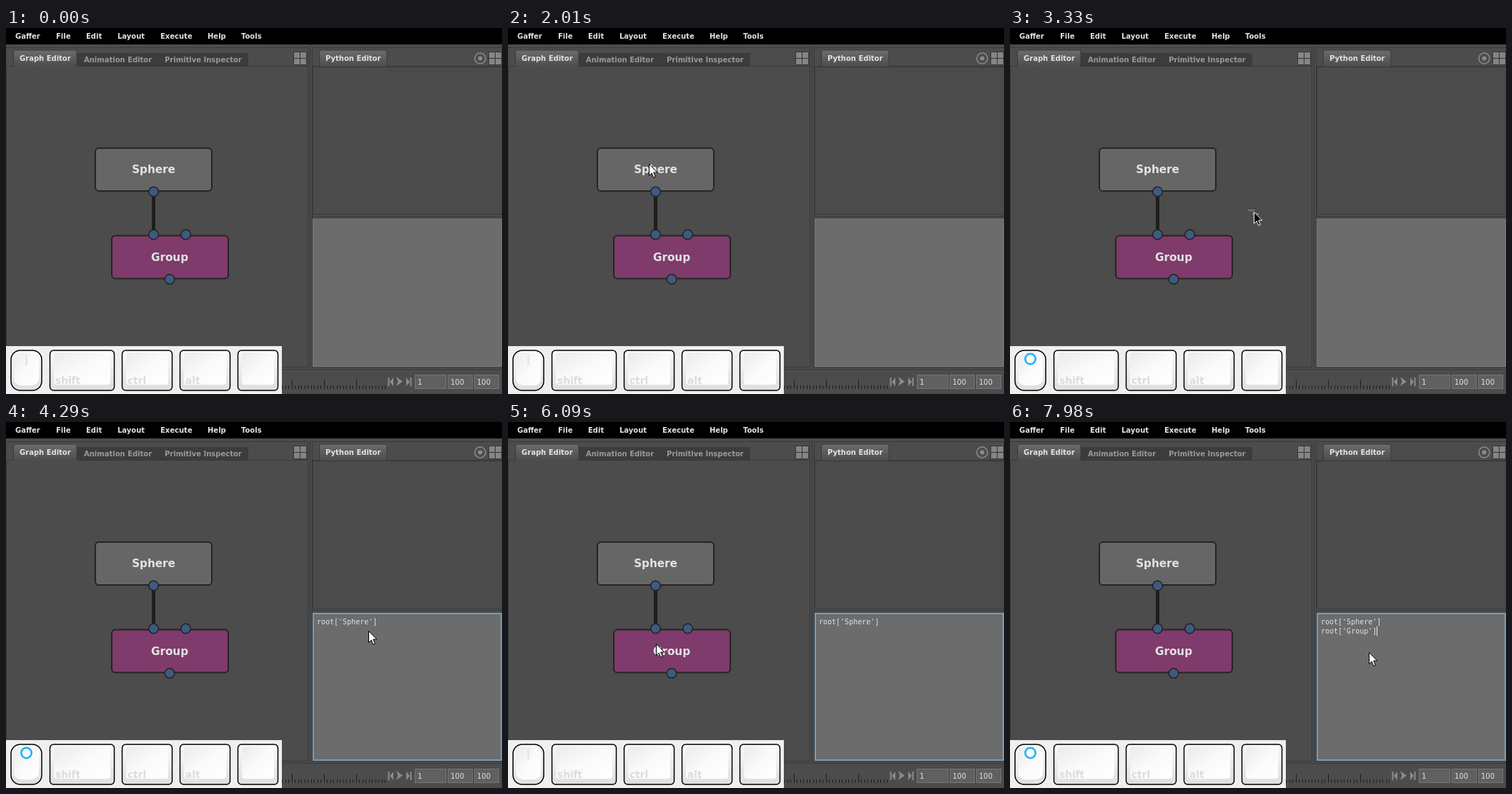
An HTML page that plays this animation: 694x512 px, repeating every 8000 ms.

```html
<!DOCTYPE html>
<html lang="en">
<head>
<meta charset="utf-8">
<title>Dragging nodes into the Python Editor</title>
<style>
  html, body { margin: 0; width: 100%; height: 100%; overflow: hidden; background: #4c4c4c; }
  svg { display: block; }
  text { font: bold 10px "DejaVu Sans", sans-serif; fill: #e2e2e2; white-space: pre; }
  .dim { fill: #999; }
  .node { font-size: 15.2px; text-anchor: middle; }
  .num { font-weight: normal; }
  .code { font: 10px "DejaVu Sans Mono", monospace; }
  .mod { font-size: 13.7px; fill: #dcdcdc; }
  .enter { font-size: 15.7px; fill: #000; }
  .plug { fill: #3f5a80; stroke: #222; stroke-width: 1.5; }
  .key { fill: url(#side); stroke: #000; stroke-width: 1.5; }
  .box { fill: #4b4b4b; stroke: #393939; }
  .line { fill: none; stroke: #393939; }
</style>
</head>
<body>
<svg width="694" height="512" viewBox="0 0 694 512">
  <defs>
    <linearGradient id="tab" x2="0" y2="1"><stop stop-color="#6c6c6c"/><stop offset="1" stop-color="#4c4c4c"/></linearGradient>
    <linearGradient id="side" x2="0" y2="1"><stop stop-color="#fafafa"/><stop offset="1" stop-color="#dedede"/></linearGradient>
    <linearGradient id="face" x2="1" y2="1"><stop stop-color="#ebebeb"/><stop offset=".5" stop-color="#fafafa"/><stop offset="1" stop-color="#fff"/></linearGradient>
    <g id="grid" fill="#858585" stroke="#333"><path d="M.5.5h9v9h-9zM9.5.5h9v9h-9zM.5 9.5h9v9h-9zM9.5 9.5h9v9h-9z"/></g>
  </defs>
  <rect width="694" height="512" fill="#4c4c4c"/>
  <rect width="694" height="23" fill="#000"/>
  <g id="menu"></g>

  <path class="line" d="M0 27.5H422.5V474.5H.5V53.5H422M425.5 23V476M694 27.5H428.5V474.5H694M428 53.5H694M428 263.5H694M0 477.5H694"/>
  <rect x="99" y="35" width="240" height="18" fill="#3c3c3c"/>
  <path d="M10.5 54V34q0-3 3-3H96q3 0 3 3V54M438.5 54V34q0-3 3-3H530q3 0 3 3V54" fill="url(#tab)" stroke="#3a3a3a"/>
  <text x="19" y="46">Graph Editor</text>
  <text x="109" y="48" class="dim">Animation Editor</text>
  <text x="222" y="48" class="dim">Primitive Inspector</text>
  <text x="447" y="46">Python Editor</text>
  <use href="#grid" x="402" y="33"/>
  <use href="#grid" x="675" y="33"/>
  <circle cx="663.5" cy="42.5" r="7.5" fill="none" stroke="#8b8b8b" stroke-width="1.6"/>
  <circle cx="663.5" cy="42.5" r="3" fill="#8b8b8b"/>
  <rect id="splitter" x="423" y="25" width="4" height="451" fill="#779cbd"/>

  <path d="M206.5 229V289" stroke="#1e1e1e" stroke-width="5"/>
  <rect x="125" y="168" width="163" height="60" rx="5" fill="#666" stroke="#242424" stroke-width="2"/>
  <rect x="148" y="290.5" width="163" height="60" rx="5" fill="#7f3b6b" stroke="#242424" stroke-width="2"/>
  <text x="206.5" y="203" class="node">Sphere</text>
  <text x="229" y="326" class="node">Group</text>
  <g id="plugs"></g>

  <rect class="box" x="429.5" y="54.5" width="270" height="206"/>
  <rect x="429.5" y="267.5" width="264" height="206" fill="#6c6c6c" stroke="#7c7c7c"/>
  <rect id="focus" x="430" y="268" width="263" height="205" fill="none" stroke="#779cbd" stroke-width="2"/>
  <text id="line1" x="435" y="283" class="code">root['Sphere']</text>
  <text id="line2" x="435" y="296" class="code">root['Group']</text>
  <rect id="caret" width="1" height="13" fill="#f0f0f0"/>

  <path id="ticks" stroke="#1c1c1c" fill="none"/>
  <path d="M535.5 489V501M564 490l-0 0M566.5 489V501" stroke="#8b8b8b" stroke-width="2"/>
  <path d="M542 489v12l-5-6zM546 488l9 6.500-9 6.500 2.500-6.500zM560 489v12l5-6z" fill="#8b8b8b"/>
  <g id="fields"></g>

  <rect id="panel" y="445" height="67" fill="#efefef"/>
  <rect class="key" x="7" y="451" width="43" height="56" rx="13"/>
  <rect x="11" y="454" width="35" height="46" rx="10" fill="url(#face)"/>
  <rect x="27" y="457" width="3" height="15" rx="1.500" fill="#e6e6e6"/>
  <circle id="ring" cx="28.500" cy="463" r="7.200" fill="#fbfbfb" stroke="#1fb4f6" stroke-width="2.600"/>
  <g id="keys"></g>
  <g id="enter">
    <text x="334" y="470" class="enter">Enter</text>
    <path d="M332.500 490l6-5v3H348V481.500h3.500V492H338.500v3z" fill="#fff" stroke="#000" stroke-width="1.200"/>
  </g>

  <g id="pointer">
    <g id="drag" fill="#666" stroke="#3a3a3a"><path d="M-9.500-4.500h12v5h-12zM-3.500 .5h12v5h-12z"/></g>
    <path id="arrow" d="M.5.5V16.500L4.200 13 6.700 19.300 9.300 18.200 6.700 12H11.700Z"/>
  </g>
</svg>
<script>
const $ = id => document.getElementById(id);
const show = (id, on) => $(id).setAttribute('visibility', on ? 'visible' : 'hidden');
const set = (id, attrs) => { for (const k in attrs) $(id).setAttribute(k, attrs[k]); };
const fill = (id, items, draw) => { $(id).innerHTML = items.map(draw).join(''); };

fill('menu', [['Gaffer', 13], ['File', 70], ['Edit', 112], ['Layout', 156], ['Execute', 216], ['Help', 282], ['Tools', 329]],
  ([name, x]) => `<text x="${x}" y="15">${name}</text>`);
fill('plugs', [[206.5, 229], [206.5, 289], [251.5, 289], [229, 351.5]],
  ([x, y]) => `<circle class="plug" cx="${x}" cy="${y}" r="6.800"/>`);
fill('fields', [[572, 43, 1], [618, 34, 100], [655, 34, 100]],
  ([x, w, n]) => `<rect x="${x}.5" y="485.500" width="${w}" height="19" fill="#606060" stroke="#767676"/>
    <text class="num" x="${x + 4}" y="499">${n}</text>`);
fill('keys', [['shift', 61, 91], ['ctrl', 162, 71], ['alt', 243, 71], ['', 324, 57]],
  ([name, x, w]) => `<rect class="key" x="${x + .5}" y="451" width="${w - 1}" height="56" rx="5"/>
    <rect x="${x + 6}" y="454" width="${w - 12}" height="45" rx="4" fill="url(#face)"/>
    <text class="mod" x="${x + 8}" y="498">${name}</text>`);
const [blankKey, blankFace] = [...$('keys').querySelectorAll('rect')].slice(-2);

let ticks = '';
for (let i = -3; i < 30; i++) ticks += `M${Math.floor(400 + 4.5 * i) + .5} ${i % 10 ? 500 : 492}V505`;
set('ticks', { d: ticks });

// Pointer keys: time, x, y
const path = [
  [1320, -14, 217], [2010, 197, 189.5], [2160, 224, 182],
  [3030, 224, 182], [3330, 341, 257], [3690, 507, 292],
  [5340, 507, 292], [5520, 427.5, 309], [6090, 207, 310],
  [6660, 207, 310], [6960, 336, 316], [7320, 502, 322], [8000, 502, 322]
];

// Velocity at key i; zero where the pointer rests
function slope(i, c) {
  const a = path[Math.max(i - 1, 0)], k = path[i], b = path[Math.min(i + 1, path.length - 1)];
  if (i && (a[c] === k[c] || b[c] === k[c])) return 0;
  return (b[c] - a[c]) / (b[0] - a[0]);
}

function place(t, c) {
  let i = 0;
  while (i < path.length - 2 && t >= path[i + 1][0]) i++;
  const a = path[i], b = path[i + 1], h = b[0] - a[0], u = Math.max(0, (t - a[0]) / h), v = 1 - u;
  return a[c] + (b[c] - a[c]) * u * u * (3 - 2 * u)
    + h * u * v * (slope(i, c) * v - slope(i + 1, c) * u);
}

// Caret: from, to, x, y
const carets = [
  [3510, 3930, 435, 273], [4350, 4770, 519, 273], [5010, 5190, 435, 286],
  [5610, 6030, 435, 286], [7140, 7560, 435, 286], [7980, 8000, 513, 286]
];

function draw(now) {
  const t = Math.floor(now % 8000 / 30) * 30;
  const within = (from, to) => t >= from && t < to;

  const dragging = within(3060, 4290) || within(6690, 7830);
  show('pointer', t >= 1350);
  show('drag', t >= 1350 && dragging);
  set('pointer', { transform: `translate(${Math.round(place(t, 1))} ${Math.round(place(t, 2))})` });
  set('arrow', { fill: dragging ? '#000' : '#fff', stroke: dragging ? '#fff' : '#000' });

  show('focus', within(3510, 6300) || t >= 7140);
  show('splitter', within(5550, 5580));
  show('line1', t >= 4290);
  show('line2', t >= 7830);
  const caret = carets.find(c => within(c[0], c[1]));
  show('caret', caret);
  if (caret) set('caret', { x: caret[2], y: caret[3] });

  show('ring', within(2460, 4830) || t >= 6270);
  const enter = within(5010, 5610);
  show('enter', enter);
  set('panel', { width: enter ? 420 : 386 });
  blankKey.setAttribute('width', enter ? 90 : 56);
  blankFace.setAttribute('width', enter ? 79 : 45);
}

const start = performance.now();
function loop() {
  draw(performance.now() - start);
  requestAnimationFrame(loop);
}
loop();
</script>
</body>
</html>
```
